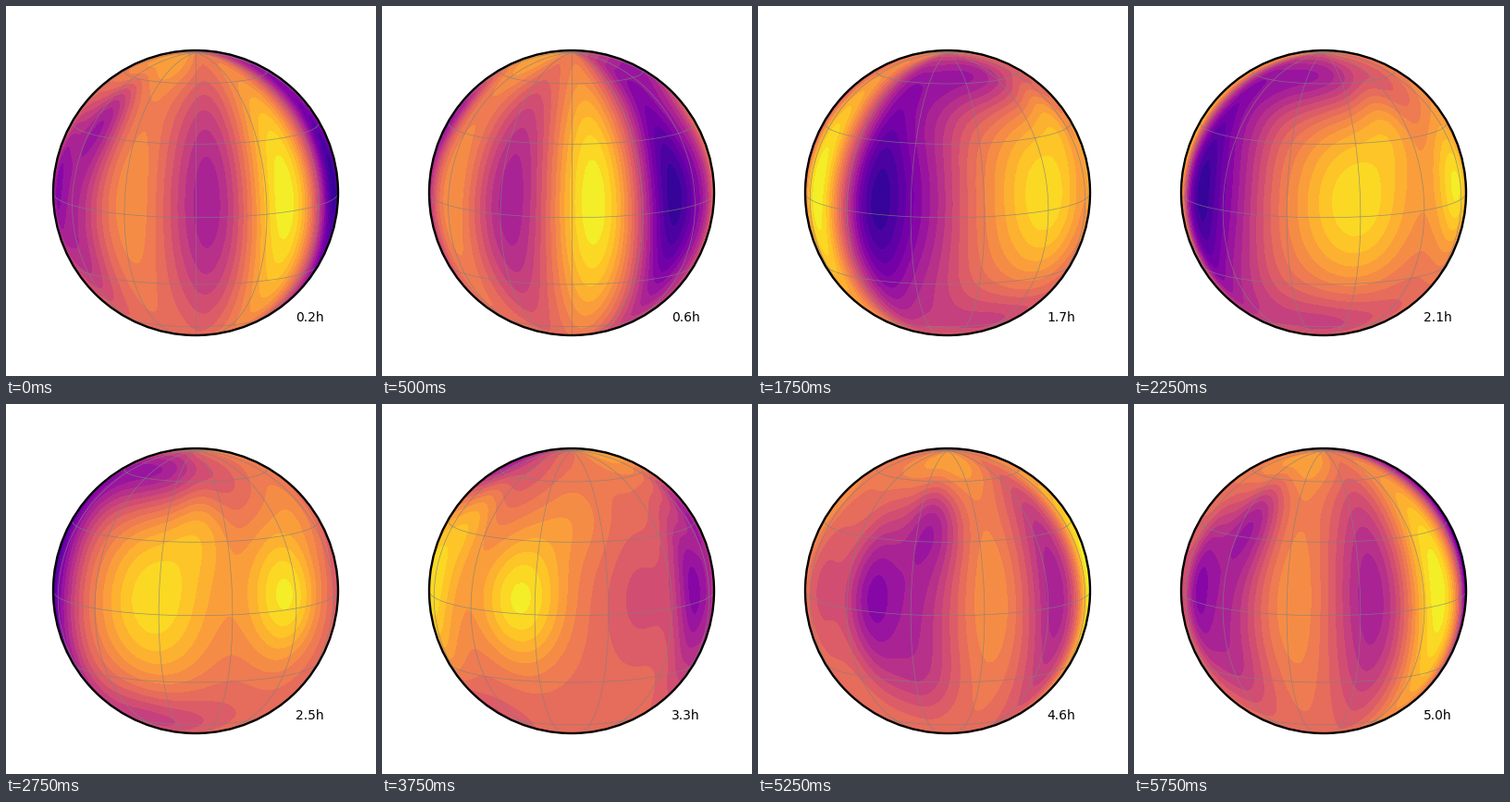
Animation of 400 by 400 pixels, one loop 6000 ms. Source, as a matplotlib script:

```python
import numpy as np
import matplotlib.pyplot as plt
from matplotlib.animation import FuncAnimation
from matplotlib.patches import Circle

FRAMES = 24
HOURS = 5.0
TILT = np.radians(10)
MEAN = 0.63

# bands that cross the equator: longitude, amplitude, width
BANDS = [
    (5, -0.27, 11), (39, 0.36, 11), (74, -0.50, 11), (95, -0.25, 12),
    (148, 0.31, 18), (204, 0.33, 13), (254, -0.10, 11), (283, -0.32, 9),
    (303, -0.20, 10), (333, 0.12, 9),
]

# spots away from the equator: longitude, latitude, amplitude, width
SPOTS = [
    (125, 64, -0.30, 38), (135, -54, -0.17, 32), (312, 74, 0.16, 40),
    (308, 38, -0.20, 10), (302, -28, -0.10, 14),
    (168, 38, 0.13, 10), (225, 40, 0.10, 14),
]


def bump(lon, lat, lon0, lat0, width, height):
    d = (lon - lon0 + 180) % 360 - 180
    return np.exp(-0.5 * ((d / width) ** 2 + ((lat - lat0) / height) ** 2))


def brightness(lon, lat):
    value = np.full_like(lon, MEAN)
    for lon0, amp, width in BANDS:
        height = 28 + 10 * np.cos(np.radians(lon0 - 50))
        value += amp * bump(lon, lat, lon0, 6, width, height)
    for lon0, lat0, amp, width in SPOTS:
        value += amp * bump(lon, lat, lon0, lat0, width, 15)
    return np.clip(value, 0.06, 0.999)


def project(lon, lat):
    lon, lat = np.radians(lon), np.radians(lat)
    front = np.cos(lat) * np.cos(lon)
    x = np.cos(lat) * np.sin(lon)
    y = np.sin(lat) * np.cos(TILT) - front * np.sin(TILT)
    seen = np.sin(lat) * np.sin(TILT) + front * np.cos(TILT) >= 0
    return np.where(seen, x, np.nan), np.where(seen, y, np.nan)


def unproject(x, y):
    shrink = np.maximum(1, np.hypot(x, y) / 0.9999)
    x, y = x / shrink, y / shrink
    z = np.sqrt(1 - x**2 - y**2)
    lat = np.arcsin(y * np.cos(TILT) + z * np.sin(TILT))
    lon = np.arctan2(x, z * np.cos(TILT) - y * np.sin(TILT))
    return np.degrees(lon), np.degrees(lat)


side = np.linspace(-1.01, 1.01, 260)
X, Y = np.meshgrid(side, side)
LON, LAT = unproject(X, Y)
LEVELS = np.linspace(0, 1, 21)

fig = plt.figure(figsize=(4, 4), dpi=100, facecolor="white")
ax = fig.add_axes([51 / 400, 44 / 400, 308 / 400, 308 / 400])


def draw_grid(center):
    style = dict(color="gray", lw=0.5, alpha=0.8)
    lats = np.linspace(-90, 90, 181)
    for lon in range(0, 360, 30):
        ax.plot(*project(lon - center, lats), **style)
    lons = np.linspace(-180, 180, 721)
    for lat in range(-60, 61, 30):
        ax.plot(*project(lons, lat), **style)


def draw(i):
    ax.clear()
    ax.set_axis_off()
    ax.set(xlim=(-1, 1), ylim=(-1, 1))
    center = 360 * i / FRAMES
    disc = Circle((0, 0), 1, transform=ax.transData)
    layers = ax.contourf(X, Y, brightness(LON + center, LAT), LEVELS, cmap="plasma")
    layers.set_clip_path(disc)
    draw_grid(center)
    ax.add_patch(Circle((0, 0), 1, fill=False, ec="black", lw=1.7,
                        clip_on=False, zorder=5))
    ax.text(0.85, 0.05, f"{HOURS * (i + 1) / FRAMES:.1f}h",
            transform=ax.transAxes, fontsize=10, family="DejaVu Sans", zorder=6)
    return []


anim = FuncAnimation(fig, draw, frames=FRAMES, init_func=lambda: draw(0),
                     interval=250, repeat=True, repeat_delay=0)
plt.show()
```
